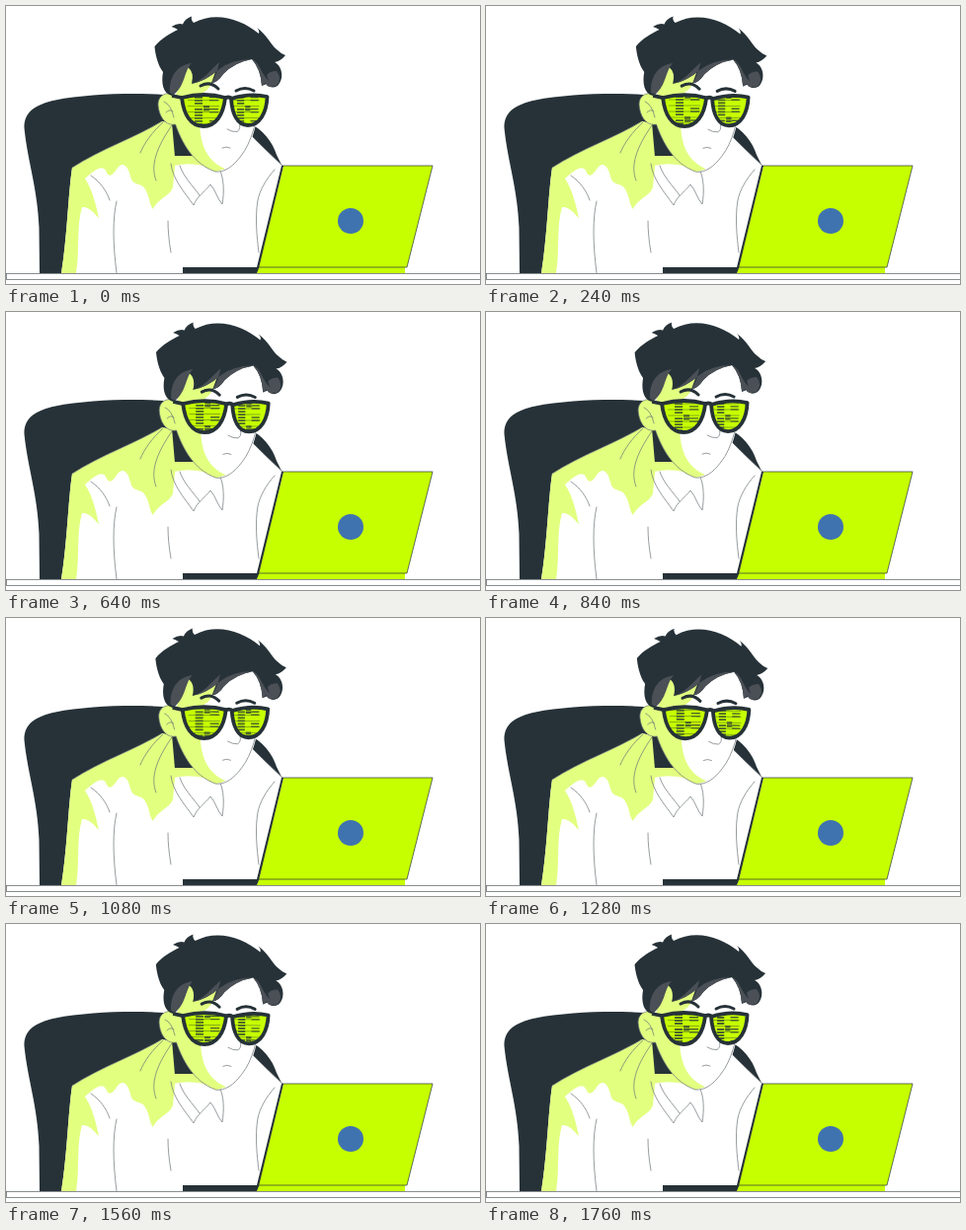
These frames come from a looping animation (480x282 px, 1800 ms). An HTML page:

```html
<!DOCTYPE html>
<html lang="en">
<head>
<meta charset="utf-8">
<title>Working at a laptop</title>
<style>
html, body { margin: 0; width: 100%; height: 100%; overflow: hidden; background: #fff; }
svg { display: block; width: 480px; height: 282px; }
.dark { fill: #263238; }
.white { fill: #fff; }
.glow { fill: #e2ff80; }
.lime { fill: #c6ff00; }
.grey { fill: #4b5056; }
.line { fill: none; stroke: #6b7276; stroke-width: .7; stroke-linecap: round; stroke-linejoin: round; }
.rim { fill: none; stroke: #263238; stroke-width: 3.8; stroke-linejoin: round; }
.brow { fill: none; stroke: #263238; stroke-width: 3; stroke-linecap: round; }
</style>
</head>
<body>
<svg viewBox="0 0 480 282">
  <defs>
    <path id="lensL" d="M178 93Q201 87 222 93C220 111 212 122 200 122C187 122 180 110 178 93Z"/>
    <path id="lensR" d="M228 94Q247 88 264.500 92C264 108 257 121 245 121C234 121 229 109 228 94Z"/>
    <clipPath id="lenses"><use href="#lensL"/><use href="#lensR"/></clipPath>
  </defs>

  <!-- chair -->
  <path class="dark" d="M34 271L33.500 225C32 185 22 158 18.500 124C18 107 30 100 50 95.500C82 89 130 88 160 90L245 118C260 125 270 138 274 151L280 163L240 180L60 271Z"/>

  <!-- shirt -->
  <path class="white" d="M158 117C132 133 96 145 67 164C63 190 62 235 56 271H255L280 162C269 152 258 141 248 131L220 162L172 152L171 120Z"/>
  <path class="glow" d="M158 117C132 133 96 145 67 164C63 190 62 235 56 271H71C75 247 71 224 77 204C86 204 89 211 94 215C91 202 88 187 80 175C88 168 97 160 101 167C104 175 108 172 113 164C119 157 124 163 126 173C129 184 137 178 141 186C146 194 145 202 149 206C155 194 166 193 169 184L172 153L171 120Z"/>
  <path class="line" d="M158 117C132 133 96 145 67 164M86 172C96 179 102 188 105 197M112 198C108 215 108 240 112 271M167 250C165 238 164 228 164 218M159 118C148 128 140 139 136 149M168 121C152 144 146 162 152 177M248 131C258 141 269 152 280 162M272 166C263 176 257 187 255 197C252 214 254 234 256 250"/>

  <!-- neck and collar -->
  <path class="dark" d="M168 118L171 153L196 154L186 130Z"/>
  <path class="white" d="M171 157L190 160L216 165C221 175 221 189 219 201C214 196 212 186 207 181C201 189 194 192 190 202C180 190 170 175 171 157Z"/>
  <path class="glow" d="M170 152L193 152L204 163Q187 158 170 162Z"/>
  <path class="line" d="M167 160C169 176 180 188 190 202C194 192 201 189 207 181C212 186 214 196 219 201C221 189 221 175 216 165M176 162C180 174 189 182 196 192"/>

  <g id="head">
    <path class="glow" d="M172 91C165 86 154 89 154 100C155 113 162 122 171.500 120C178 138 189 160 212 168L225 165L215 58L180 60Z"/>
    <path class="white" d="M195 90C210 85 209 72 220 63L250 48L257 82C256 116 250 145 233 159C226 166 219 168 214 168L222 165C203 157 197 141 196 119Z"/>
    <path class="line" d="M172 91C165 86 154 89 154 100C155 113 162 122 171.500 120C178 138 189 160 212 168C221 169 230 163 238 152C249 138 254 116 256 95M160 97Q167 100 170 113M162 108Q166 104 169 107M235 115C237 120 238 125 234 127.500Q229 128 224 125M219 144Q223 142 227 144"/>

    <!-- hair -->
    <path class="dark" d="M168 91C159 89 157 78 159 67C153 59 151 47 150.500 41C157 33 166 28 174 24Q171 22 167.500 21Q174 17 179 18.500Q181 13 188 10.500Q187 14 190 17C212 5 238 13 256 28Q257 25 254 22C264 29 268 39 274 44Q278 48 283 50Q278 56 272 57C280 61 282 74 275 81Q268 85 264 79L259 81Q258 64 249 54Q231 57 220 69Q214 78 208 78L212 67Q201 76 188 79Q191 67 184 62C178 68 180 79 168 91Z"/>
    <path class="grey" d="M166 88C165 73 172 60 188 58C180 66 182 80 170 90ZM188 79C199 76 206 66 216 57Q213 71 208 78Q214 78 220 69Q232 57 249 54Q229 54 216 64Q203 76 188 79ZM249 54C259 58 257 72 273 81Q264 84 263 78L259 81Q258 64 249 54ZM264 70Q267 66 274 66Q280 74 274 81Q267 82 264 70Z"/>
    <path class="brow" d="M197 81Q207 75.500 215 84M233 86Q242 81 251 86"/>

    <!-- glasses -->
    <use href="#lensL" class="lime"/>
    <use href="#lensR" class="lime"/>
    <g clip-path="url(#lenses)"><g id="code" class="dark" opacity=".75"></g></g>
    <path class="rim" d="M168 91L178 93M221 94Q225 91 229 94"/>
    <use href="#lensL" class="rim"/>
    <use href="#lensR" class="rim"/>
  </g>

  <!-- laptop -->
  <path class="lime" d="M281 162H432L406 265H404V271H254Z"/>
  <path class="line" style="stroke:#263238" d="M280 162H432L406 265H255"/>
  <path class="dark" d="M279 162H281L256 266L254 271H179V265H254Z"/>
  <circle cx="349" cy="218" r="13" fill="#3f73b0"/>

  <!-- desk -->
  <rect class="white" x=".5" y="271.500" width="481" height="6" stroke="#6b7276" stroke-width=".8"/>
</svg>
<script>
const PERIOD = 900, PITCH = 3, ROWS = 16;
const head = document.getElementById("head");
const code = document.getElementById("code");

let bars = "";
const bar = (x, y, w, h) => bars += `<rect x="${x}" y="${y}" width="${w}" height="${h}"/>`;
for (let i = 0; i < ROWS * 2; i++) {
  const y = 92 + i * PITCH, row = i % ROWS;
  for (const [x, k] of [[191, 1], [234, .9]]) {
    if (row % 8 !== 3) bar(x, y, 8 * k, 1.8);
    if (row % 8 === 3 || row % 8 === 4) bar(x + 9 * k, y, 6 * k, 2.4);
    if (row % 4 < 2) bar(x + 15 * k, y, 9 * k, 1.4);
    if (row % 2) bar(x - 7 * k, y + .5, 32 * k, .5);
  }
}
code.innerHTML = bars;

function draw(now) {
  const phase = now % PERIOD / PERIOD;
  const sway = (1 - Math.cos(phase * 2 * Math.PI)) / 2;
  head.setAttribute("transform", `translate(${1.3 * sway} ${.2 * sway}) rotate(${.55 * sway} 195 165)`);
  code.setAttribute("transform", `translate(0 ${-phase * PITCH * ROWS})`);
  requestAnimationFrame(draw);
}
draw(0);
</script>
</body>
</html>
```
